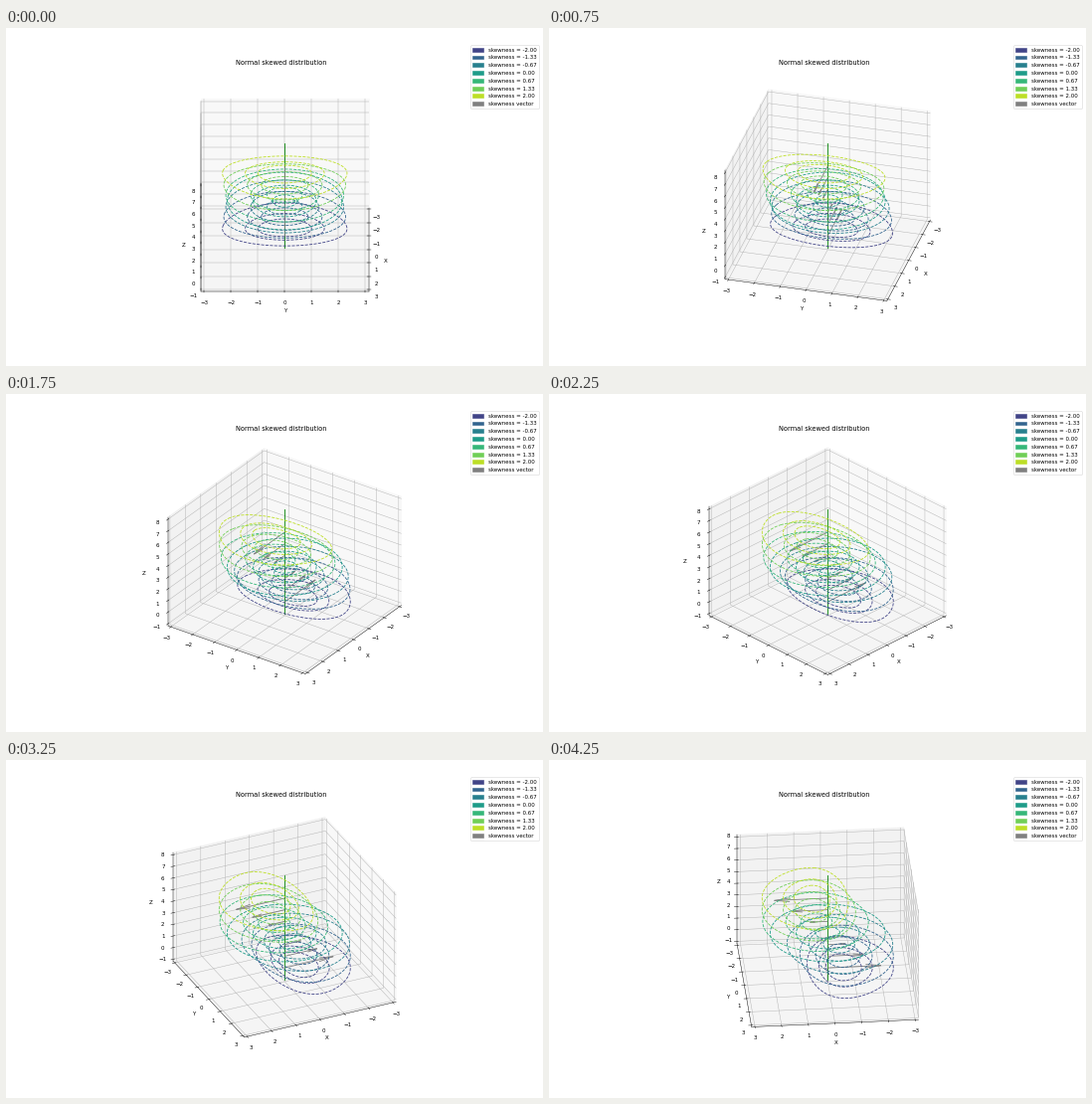
Write a matplotlib script that moves like this. It is 540 px wide and 340 px high and loops after 4500 ms.

```python
import math

import matplotlib.pyplot as plt
import numpy as np
from matplotlib.animation import FuncAnimation
from matplotlib.patches import Patch

WIDTH, HEIGHT, DPI = 540, 340, 40
FRAMES, INTERVAL = 18, 250
SKEWS = np.linspace(-2, 2, 7)
COLORS = plt.cm.viridis(np.linspace(0.2, 0.9, len(SKEWS)))
LEVELS = np.array([0.1, 0.5, 0.9]) / (2 * math.pi)
MARGIN = 1 / 48

normal_cdf = np.vectorize(lambda t: 0.5 * (1 + math.erf(t / math.sqrt(2))))


def skewed_density(x, y, skew):
    return np.exp(-(x**2 + y**2) / 2) / math.pi * normal_cdf(skew * x)


def padded(low, high):
    pad = (high - low) * MARGIN
    return low - pad, high + pad


fig = plt.figure(figsize=(WIDTH / DPI, HEIGHT / DPI), dpi=DPI)
ax = fig.add_subplot(projection="3d", proj_type="ortho")

grid = np.linspace(-3, 3, 100)
x, y = np.meshgrid(grid, grid)
for height, (skew, color) in enumerate(zip(SKEWS, COLORS)):
    ax.contour(x, y, skewed_density(x, y, skew), levels=LEVELS, zdir="z",
               offset=height, colors=[color], linestyles="dashed")
    if abs(skew) > 1e-9:
        ax.quiver(0, 0, height, skew, 0, 0, color="gray")
ax.plot([0, 0], [0, 0], [-1, 8], color="green")

ax.set_xticks(range(-3, 4))
ax.set_yticks(range(-3, 4))
ax.set_zticks(range(-1, 9))
ax.set_xlim(*padded(-3, 3))
ax.set_ylim(*padded(-3, 3))
ax.set_zlim(*padded(-1, 8))
ax.set_xlabel("X")
ax.set_ylabel("Y")
ax.set_zlabel("Z")
ax.set_title("Normal skewed distribution")

handles = [Patch(color=c, label=f"skewness = {s:.2f}")
           for s, c in zip(SKEWS, COLORS)]
handles.append(Patch(color="gray", label="skewness vector"))
ax.legend(handles=handles, loc="upper right", bbox_to_anchor=(1.5, 1.1))


def update(frame):
    ax.view_init(elev=30, azim=90 * frame / FRAMES)
    return []


anim = FuncAnimation(fig, update, frames=FRAMES, interval=INTERVAL,
                     repeat=True, repeat_delay=0)
plt.show()
```
